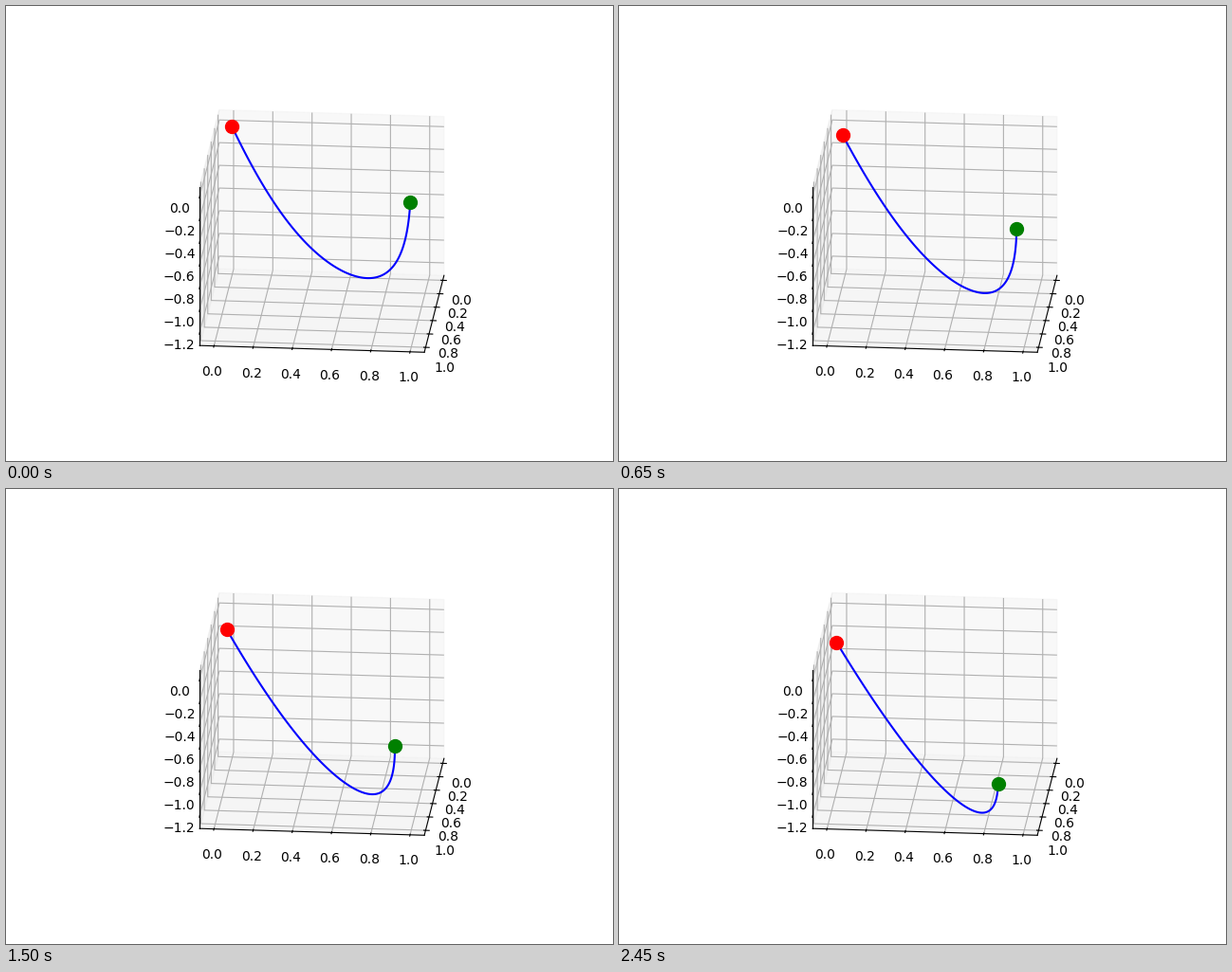
Recreate the animation shown at these times as a matplotlib script. Size 640 by 480 pixels, loop 2500 ms.

```python
import numpy as np
import matplotlib.pyplot as plt
from matplotlib.animation import FuncAnimation

FRAMES = 50
LENGTH = 3.028                    # cable length
LEAN_BACK, LEAN_SIDE = 0.155, 0.265
LEAN_DOWN = np.sqrt(1 - LEAN_BACK**2 - LEAN_SIDE**2)
DEPTH = 1.2217                    # lowest point of the cable at rest
PAD = 0.05 + 1.1 / 48

u = np.linspace(0, 1, 120)


def sag(span):
    """Sag of a catenary of fixed length along its span."""
    lo, hi = 1e-3, 10.0
    for _ in range(50):
        q = (lo + hi) / 2
        if np.sinh(q) / q < LENGTH / span:
            lo = q
        else:
            hi = q
    return span / (2 * q) * (np.cosh(q) - np.cosh(q * (2 * u - 1)))


def ends(frame):
    step = frame + 2
    return np.array([0.01 * step, 0, 0]), np.array([1 + 0.03 * step, 1, 0])


def cable_points(a, b):
    chord = b - a
    span = np.linalg.norm(chord)
    along = chord / span
    side = np.array([-along[1], along[0], 0])
    hang = LEAN_SIDE * side - LEAN_BACK * along - np.array([0, 0, LEAN_DOWN])
    return a[:, None] + np.outer(chord, u) + np.outer(hang, sag(span))


fig = plt.figure(figsize=(6.4, 4.8), dpi=100)
ax = fig.add_subplot(projection="3d", proj_type="ortho")
ax.view_init(elev=20, azim=5)

cable, = ax.plot([], [], [], "b-", lw=1.5)
left, = ax.plot([], [], [], "o", color="red", ms=10)
right, = ax.plot([], [], [], "o", color="green", ms=10)

ax.set_xlim3d(-PAD, 1 + PAD, view_margin=0)
ax.set_ylim3d(-PAD, 1 + PAD, view_margin=0)
ax.set_zlim3d(-DEPTH * (1 + PAD), DEPTH * PAD, view_margin=0)


def update(frame):
    a, b = ends(frame)
    cable.set_data_3d(*cable_points(a, b))
    left.set_data_3d(*a[:, None])
    right.set_data_3d(*b[:, None])
    return cable, left, right


anim = FuncAnimation(fig, update, frames=FRAMES, interval=50,
                     repeat=True, repeat_delay=0, blit=False)
plt.show()
```
